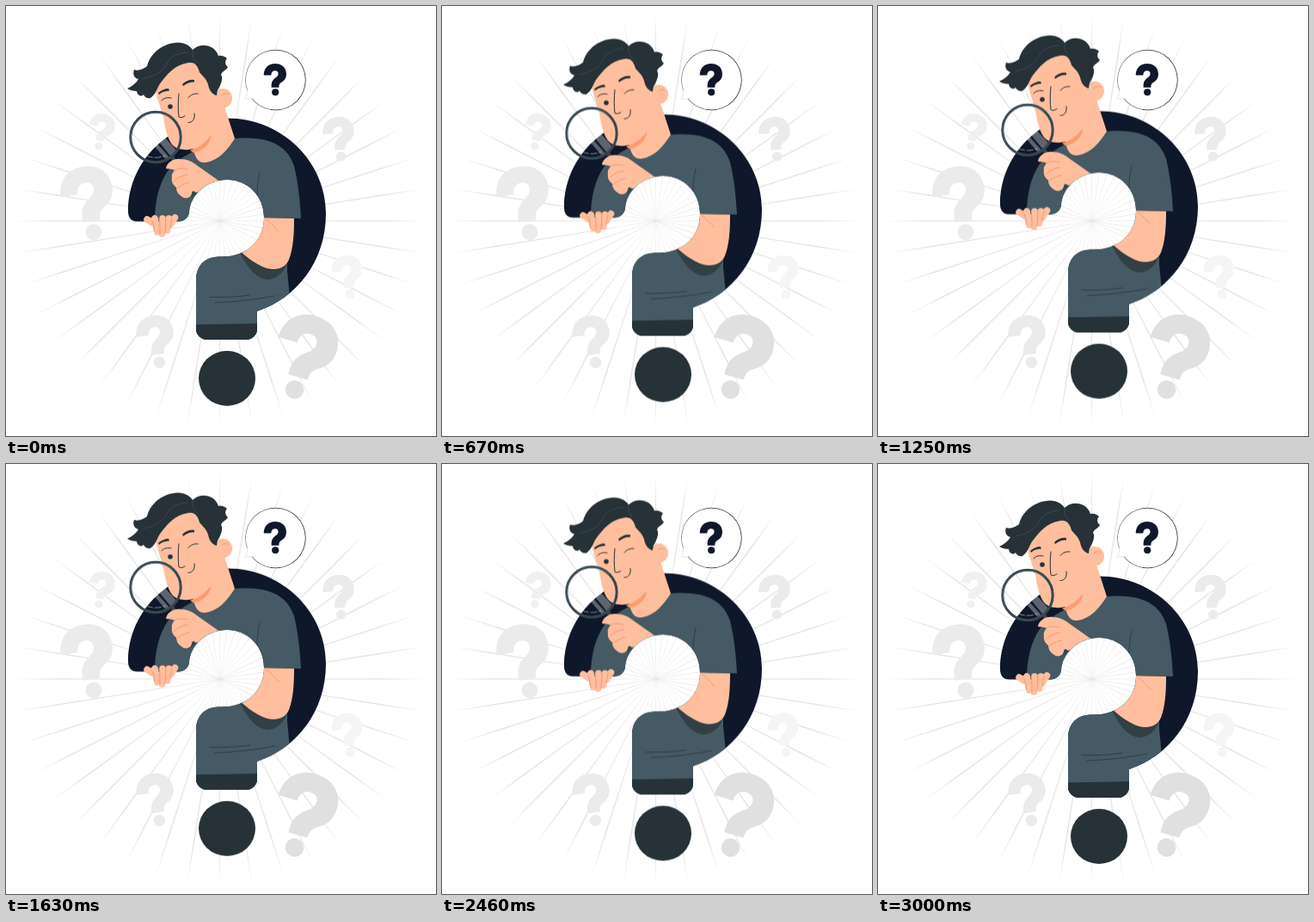
An HTML page for the animation above (3.04 s loop, 500 by 500 pixels).

```html
<!DOCTYPE html>
<html lang="en">
<head>
<meta charset="utf-8">
<title>Curious man with a magnifier</title>
<style>
  html, body { margin: 0; width: 100%; height: 100%; overflow: hidden; background: #fff; }
  svg { display: block; width: 100%; height: 100%; }
  .skin { fill: #ffbe9d; }
  .dark { fill: #263238; }
  .cloth { fill: #455a64; }
  .navy { fill: #0f172a; }
  .line { fill: none; stroke: #263238; stroke-width: 1; stroke-linecap: round; stroke-linejoin: round; }
  .fold { fill: none; stroke: #f28f63; stroke-width: .8; stroke-linecap: round; }
  .finger { fill: none; stroke: #ffbe9d; stroke-width: 7.6; stroke-linecap: round; stroke-linejoin: round; }
  /* 24 steps per second, 1.5 s each way, then a short rest */
  #figure { animation: float 3040ms -5ms infinite; }
  @keyframes float {
    0% { transform: translateY(0); animation-timing-function: steps(36, end); }
    49.342% { transform: translateY(-10px); animation-timing-function: steps(36, end); }
    98.684%, 100% { transform: translateY(0); }
  }
</style>
</head>
<body>
<svg viewBox="0 0 500 500">
  <defs>
    <!-- question mark with its dot centred on 0,0 -->
    <g id="mark">
      <path d="M-36 -53C-36 -76 -21 -89 -1 -89C20 -89 34 -76 34 -57C34 -43 27 -36 19 -31C13 -27 11 -24 11 -15H-12C-13 -31 -9 -38 2 -46C7 -50 9 -53 9 -58C9 -64 5 -67 -1 -67C-8 -67 -13 -62 -13 -53Z"/>
      <circle r="10.800"/>
    </g>
    <clipPath id="inside">
      <path d="M142 239C142 178 194 130.500 257 130.500C321 130.500 372 181 372 241C372 298 337 340 292 355V375.500A12.500 12.500 0 0 1 279.500 388H233.500A12.500 12.500 0 0 1 221 375.500V319C221 302 231 292 247 291.500C281 293 300 272 300 246C300 221 281 202 257 202C233 202 214 220 213 240C212 246 207 250.500 201 250.500H152C146 250.500 142 246 142 239Z"/>
    </clipPath>
    <clipPath id="lens"><circle cx="174" cy="152.500" r="28"/></clipPath>
  </defs>

  <g id="rays" fill="#e6e6e6"></g>

  <use href="#mark" fill="#ebebeb" transform="translate(102 263) rotate(-9) scale(.87)"/>
  <use href="#mark" fill="#f0f0f0" transform="translate(108 163) rotate(10) scale(.43)"/>
  <use href="#mark" fill="#ebebeb" transform="translate(389.500 175) rotate(-5) scale(.52)"/>
  <use href="#mark" fill="#f5f5f5" transform="translate(400 335) rotate(-6) scale(.51)"/>
  <use href="#mark" fill="#ebebeb" transform="translate(178.500 414.500) rotate(-8) scale(.62)"/>
  <use href="#mark" fill="#e0e0e0" transform="translate(335.500 446) rotate(17)"/>

  <circle class="dark" cx="313.500" cy="86" r="35.200"/>
  <circle cx="313.300" cy="86" r="34.600" fill="#fff"/>
  <path d="M280 97C281 102 280 105 278 107.500C282 109 286 108 289 107" fill="#fff" stroke="#ccc" stroke-width=".5"/>
  <use href="#mark" class="navy" transform="translate(313.200 100.300) scale(.375)"/>

  <g id="figure">
    <g clip-path="url(#inside)">
      <rect class="navy" x="130" y="120" width="250" height="280"/>
      <path class="cloth" d="M173 252C173 222 180 202 191 188C200 178 210 174 219 168L267 154C306 151 327 162 335 186C340 207 342 227 343 247L298 246L256 250L212 252Z"/>
      <path class="cloth" d="M215 285H327V308L329.500 334L300 395H215Z"/>
      <path d="M270 283C279 301 289 317 304 318C315 318 325 309 328 294Z" fill="#323f45"/>
      <path class="skin" d="M290 246L335 247C335 266 334 282 329 295C324 307 309 309 296 302C286 297 279 291 270 283Z"/>
      <path class="fold" d="M302 248C307 251 312 257 317 262"/>
      <path class="dark" d="M215 370.500L300 369V395H215Z"/>
      <path class="line" d="M237 338.500C255 339 273 338 284 336M243 345C268 344 292 341 313 337M295 194C293 203 292 211 292 220" stroke-width=".8" style="stroke-width:.7"/>
    </g>
    <ellipse class="dark" cx="257" cy="433" rx="33" ry="32"/>

    <!-- neck and head -->
    <path class="skin" d="M213 160L250 112L254 117L266 154C258 167 247 180 232 182C224 183 220 177 218 167Z"/>
    <path d="M214 168C226 164 234 157 238 149C239 159 230 168 219 171Z" fill="#ff9a6c"/>
    <path class="skin" d="M246 98C253 93 263 98 263 107C263 115 256 121 247 117Z"/>
    <path class="skin" d="M174 98C176 107 179 117 183 129C185 141 187 153 193 161C199 168 211 168 218 166C229 162 238 153 243 143L251 115L245 100L236 78L216 60L188 70Z"/>
    <path class="fold" d="M251 104C254 101 257 101 259 103"/>
    <path class="dark" d="M141 96C147 93 151 90 154 85C149 84 147 79 149 74C154 76 160 73 164 70C168 54 183 43 200 42.500C208 43 214 46 217 51C226 42 243 45 247 58C251 57 255 59 257 61C254 64 255 69 258 71C256 75 252 75 250 80C253 83 250 92 246 98L245 104C240 103 236 98 235 91C232 83 227 80 225 77C223 70 220 65 212 66C196 68 187 80 180 89C175 96 175 102 168 107C163 108 161 105 160 103C156 107 152 102 152 99C148 99 144 98 141 96Z"/>
    <path class="line" d="M160 84C174 82 184 75 188 65C193 58 202 54 211 54M217 51C216 57 218 62 222 66" style="stroke:#455a64;stroke-width:.6"/>
    <path class="dark" d="M177 101C180 98 185 96 189 96L190 98.500C185 99 181 100 178 103ZM205 91C209 87 214 85 219 86V88.500C214 88 210 90 206 93Z"/>
    <circle class="dark" cx="191" cy="117" r="2.800"/>
    <path class="line" d="M181 110C183 107 188 106 192 107M212 106.500C215 103 219 101.500 223 102M201 102C200 111 200 121 201 129C203 130 205 130 208 128M212 135.500C217 136 220 131 219 125"/>

    <!-- hand resting on the edge -->
    <g class="finger">
      <path d="M164 248L170 252L173 247L176 263"/>
      <path d="M182 247L181.500 265"/>
      <path d="M189.500 247L187.500 261"/>
      <path d="M196.500 246L191.500 254"/>
    </g>
    <path class="fold" d="M170 250C172 254 172 258 172.500 262M178 247C179 253 179 260 179 265M186 247C186 253 185.500 258 185 264M193 247C192.500 251 191.500 254 191 258"/>

    <!-- magnifier -->
    <g clip-path="url(#lens)" fill="#fff" fill-opacity=".33">
      <path d="M177 157L183 151L203 173L195 179Z"/>
      <path d="M171 161L174 158L192 178L188 181Z"/>
    </g>
    <path d="M163 174C170 177 178 177 185 174" fill="none" stroke="#fff" stroke-opacity=".6" stroke-width=".8" stroke-dasharray="8 2"/>
    <circle cx="174" cy="152.500" r="29.200" fill="none" stroke="#37474f" stroke-width="3"/>
    <path d="M149 167.500A29.200 29.200 0 0 1 194 131.500" fill="none" stroke="#5b6f78" stroke-width=".8"/>

    <!-- holding hand -->
    <g clip-path="url(#inside)">
      <path d="M191 176L194 173L222 217L216 223Z" fill="#37474f"/>
      <path class="skin" d="M186 189C187 182 195 177 203 178C211 178 217 181 223 186L250 205L221 217C218 214 216 215 216 218C215 223 209 225 205 222C200 219 198 215 198 211C194 208 192 204 193 199C192 196 194 194 196 191C193 189 189 190 186 189Z"/>
      <path class="fold" d="M196 191C201 188 206 189 211 190M195 204C199 200 205 197 211 196M199 212C203 208 209 206 213 205"/>
    </g>
  </g>
</svg>
<script>
  const rays = document.getElementById('rays');
  for (let i = 0; i < 40; i++) {
    const ray = document.createElementNS('http://www.w3.org/2000/svg', 'path');
    ray.setAttribute('d', 'M-.15 0L-.8 -190L0 -240L.8 -190L.15 0Z');
    ray.setAttribute('transform', `translate(248.5 250) rotate(${i * 9})`);
    rays.append(ray);
  }
</script>
</body>
</html>
```
